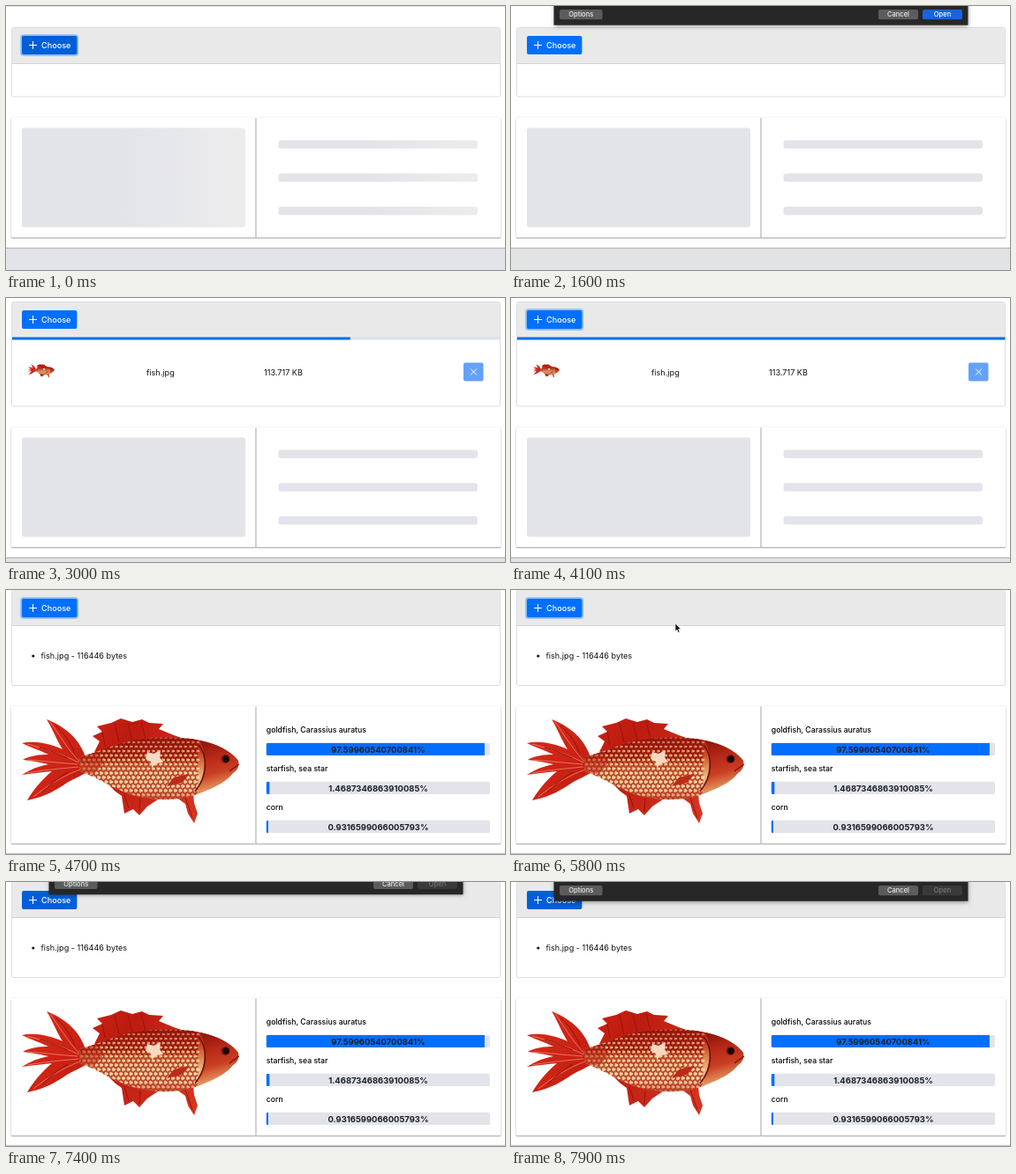
These frames come from a looping animation (565 px wide and 300 px high, 8000 ms). An HTML page with a canvas:

```html
<!DOCTYPE html>
<html lang="en">
<head>
<meta charset="utf-8">
<title>Image classifier upload</title>
<style>
html, body { margin: 0; width: 100%; height: 100%; overflow: hidden; background: #fff; }
canvas { display: block; width: 565px; height: 300px; }
</style>
</head>
<body>
<canvas id="stage"></canvas>
<script>
const W = 565, H = 300, LOOP = 8000, STEP = 100;
const FONT = 'Inter, "Liberation Sans", sans-serif';
const BLUE = '#006fff', DARK_BLUE = '#005fd8', TRACK = '#e3e4e9';

const canvas = document.getElementById('stage');
const ctx = canvas.getContext('2d');
const dpr = window.devicePixelRatio || 1;
canvas.width = W * dpr;
canvas.height = H * dpr;

const clamp = v => Math.max(0, Math.min(1, v));
const ramp = (t, a, b) => clamp((t - a) / (b - a));
const easeOut = p => 1 - (1 - p) ** 3;
const easeInOut = p => p * p * (3 - 2 * p);
const lerp = (a, b, p) => a + (b - a) * p;

function box(x, y, w, h, fill, r = 0, stroke) {
  ctx.beginPath();
  ctx.roundRect(x, y, w, h, r);
  if (fill) { ctx.fillStyle = fill; ctx.fill(); }
  if (stroke) { ctx.strokeStyle = stroke; ctx.lineWidth = 1; ctx.stroke(); }
}

function text(s, x, y, { size = 9.1, color = '#111', weight = 400, align = 'left' } = {}) {
  ctx.font = `${weight} ${size}px ${FONT}`;
  ctx.fillStyle = color;
  ctx.textAlign = align;
  ctx.fillText(s, x, y);
}

function shape(path, fill, stroke, width = 1) {
  const p = new Path2D(path);
  if (fill) { ctx.fillStyle = fill; ctx.fill(p); }
  if (stroke) { ctx.strokeStyle = stroke; ctx.lineWidth = width; ctx.stroke(p); }
}

function disc(x, y, r, fill) {
  ctx.fillStyle = fill;
  ctx.beginPath();
  ctx.arc(x, y, r, 0, 7);
  ctx.fill();
}

function gradient(x0, y0, x1, y1, ...colors) {
  const g = ctx.createLinearGradient(x0, y0, x1, y1);
  colors.forEach((c, i) => g.addColorStop(i / (colors.length - 1), c));
  return g;
}

function chooseButton(y, hover, ring) {
  if (ring) box(16.2, y - 1.8, 65.8, 24.6, '#86bcf8', 3.5);
  box(18, y, 62.4, 21, hover ? DARK_BLUE : BLUE, 2);
  shape(`M26 ${y + 10.5}h9M30.5 ${y + 6}v9`, null, '#fff', 1);
  text('Choose', 40, y + 14, { color: '#fff', size: 9.1, weight: 500 });
}

function panel(top, headerH, height) {
  box(6.5, top + .5, 553, height, '#fff', 2, '#dcdddf');
  box(7, top + 1, 552, headerH, '#e9e9e9', [2, 2, 0, 0]);
  box(7, top + headerH, 552, 1, '#d2d4d6');
}

function cards(y, h) {
  for (const x of [6, 283.5]) {
    ctx.save();
    ctx.shadowColor = 'rgba(0,0,0,.36)';
    ctx.shadowBlur = 2 * dpr;
    ctx.shadowOffsetY = .8 * dpr;
    box(x, y, 276.5, h, '#fff', 1);
    ctx.restore();
  }
  box(282.5, y, 1, h, '#c4c4c4');
  box(6, y + h, 554, 1, '#b6b6b6');
}

// shift moves the highlight from -1 (left of the block) to 1 (right of it)
function skeleton(x, y, w, h, shift) {
  const fill = Math.abs(shift) < 1
    ? gradient(x + w * shift, 0, x + w * (1 + shift), 0, TRACK, '#ececed', TRACK)
    : TRACK;
  box(x, y, w, h, fill, 3);
}

function skeletonCards(y, shift) {
  cards(y, 136);
  skeleton(18, y + 11.5, 253, 113, shift);
  for (let i = 0; i < 3; i++) skeleton(308.5, y + 25.5 + i * 37.7, 225.5, 9.5, shift);
}

function pageEnd(y, fill) {
  box(0, y, W, H - y, fill);
  box(0, y - .5, W, 1.5, '#bfc0c3');
}

const BODY = 'M82 190C100 186 118 177 142 171C170 166 205 166 228 173C246 178 257 186 263 194C264 200 262 205 257 208' +
  'C250 217 239 223 224 229C204 239 174 241 147 234C124 228 108 215 84 206Z';
const TAIL = 'M90 190C85 174 72 157 46 147C53 158 56 168 64 181C48 174 32 171 18 174C28 179 38 182 48 187' +
  'C38 187 27 188 19 193C30 194 39 196 48 198C37 200 27 204 18 210C31 208 42 207 52 206C40 216 31 227 24 239' +
  'C45 235 59 226 69 219C78 214 85 211 92 207Z';
const FINS = [
  'M100 184L106 172L98 166L109 161L103 155L119 151L130 146L143 150L154 147L162 151L178 152L173 158L190 165L204 170L148 179Z',
  'M112 217L124 229L131 234L134 254L144 249L151 256L160 246L172 238Z',
  'M192 235L203 243L206 254L213 265L217 254L213 242L212 231Z'
];

function scales() {
  for (let row = 0; row < 15; row++) {
    for (let col = 0; col < 25; col++) {
      const x = 86 + col * 5.6 + (row % 2) * 2.8, y = 168 + row * 5;
      if (x > 220) continue;
      ctx.strokeStyle = row < 6 ? '#86150b' : '#b33a22';
      ctx.lineWidth = 1.3;
      ctx.beginPath();
      ctx.arc(x, y, 3.3, Math.PI * .5, Math.PI * 1.5);
      ctx.stroke();
      ctx.fillStyle = `rgba(255,236,200,${.3 + .4 * Math.sin(row / 14 * Math.PI)})`;
      ctx.fillRect(x - 1.5, y - 1, 3, 2);
    }
  }
}

function fish() {
  const fin = gradient(18, 145, 220, 260, '#dc2c1b', '#bd1b10', '#d63822');
  shape(TAIL, fin);
  FINS.forEach(f => shape(f, fin));
  shape('M84 196C69 180 60 164 50 150M82 196C61 185 41 180 24 175M81 198C56 196 39 194 25 193' +
    'M82 201C60 203 40 205 24 208M84 204C62 212 45 224 31 235', null, '#ee8a72', .8);
  shape('M78 186C73 173 65 162 56 154M70 191C58 186 48 181 38 179M70 207C58 214 48 223 41 230', null, '#8f130c', 1);
  shape('M112 177L109 161M128 173L123 151M143 171L138 151M158 169L153 150M134 233L139 248M152 237L151 252M203 236L211 259',
    null, '#941409', .9);

  shape(BODY, gradient(0, 168, 0, 241, '#a71d0f', '#c33b1e', '#d97b45', '#eab57c', '#e9b585', '#c13a22'));
  ctx.save();
  ctx.clip(new Path2D(BODY));
  scales();
  shape('M216 164C229 184 228 210 211 242L270 230L270 164Z',
    gradient(226, 172, 240, 226, '#8f170d', '#b62817', '#c93e22', '#e59a62'));
  shape('M80 188L100 184L112 195L100 209L80 208Z', 'rgba(184,34,18,.5)');
  ctx.restore();

  shape('M218 176C229 189 228 212 214 229', null, '#6f120a', 1.7);
  shape('M160 184L167 186L175 182L174 190L178 196L170 197L165 202L164 195L158 192Z', '#f6d9c0');
  shape('M208 209L190 213L182 223L199 219Z', '#bb2b19');
  shape('M264 198Q258 202 253 206', null, '#741309', 1.2);
  disc(248.5, 192, 5, '#7d1b10');
  disc(249, 192, 3.7, '#190706');
}

function thumbnail() {
  ctx.save();
  ctx.translate(25, 75);
  ctx.scale(.121, .13);
  ctx.translate(-18, -145);
  fish();
  ctx.restore();
}

function dialog(reveal, enabled) {
  if (reveal <= 0) return;
  ctx.save();
  ctx.translate(0, -34 * (1 - reveal));
  ctx.save();
  ctx.shadowColor = 'rgba(0,0,0,.4)';
  ctx.shadowBlur = 5 * dpr;
  ctx.shadowOffsetY = 1 * dpr;
  box(48.5, -40, 469, 61.7, '#272727');
  ctx.restore();
  const button = (label, x, w, fill, color) => {
    box(x, 4, w, 11.3, fill, 2);
    text(label, x + w / 2, 12.4, { size: 7.5, color, align: 'center', weight: 500 });
  };
  button('Options', 55, 48.5, '#5c5c5c', '#eee');
  button('Cancel', 416, 45, '#5c5c5c', '#eee');
  button('Open', 466, 45, enabled ? '#1665df' : '#393939', enabled ? '#fff' : '#777');
  ctx.restore();
}

function emptyPage(t) {
  const picked = t >= 1600;
  if (t < 300) box(0, 0, W, 1, '#e2e2e2');
  panel(24, 41, 78.5);
  chooseButton(34, !picked, t < 300);
  skeletonCards(127, picked ? 1 : .45);
  pageEnd(275, picked ? '#e2e3e5' : TRACK);
  const reveal = picked ? 1 - ramp(t, 1600, 1850) : easeOut(ramp(t, 200, 700));
  dialog(reveal, t >= 1300);
}

function uploadPage(t) {
  panel(4, 41, 118.5);
  box(7, 44, 552, 3.5, '#dfe1e9');
  box(7, 44.5, 552.5 * easeInOut(ramp(t, 2400, 3350)), 3, '#0a6fe8');
  chooseButton(14, false, t >= 3400);
  if (t >= 2300) thumbnail();
  text('fish.jpg', 159, 87.5);
  text('113.717 KB', 292, 87.5);
  box(518, 73.5, 22.5, 21, '#63a1fa', 2);
  shape('M526 80.5l7 7m0-7l-7 7', null, '#fff', 1);
  skeletonCards(147, lerp(-1, 1, ramp(t, 1750, 2450)));
  pageEnd(295, '#e2e3e5');
}

const RESULTS = [
  ['goldfish, Carassius auratus', '97.59960540700841%', .976],
  ['starfish, sea star', '1.4687346863910085%', .0147],
  ['corn', '0.9316599066005793%', .0093]
];

function resultRow([label, value, share], i) {
  const x = 294.6, y = 173.7 + i * 44, w = 253.4, h = 14.4;
  text(label, 294.8, y - 11.5, { size: 8.7, weight: 500, color: '#000' });
  ctx.save();
  box(x, y, w, h, TRACK, 2.2);
  ctx.clip();
  box(x, y, Math.max(2.4, w * share), h, BLUE);
  ctx.restore();
  text(value, 421.5, y + 10.8, { size: 9.45, weight: 700, align: 'center', color: '#1c2024' });
}

function arrowCursor(x, y) {
  shape(`M${x} ${y}v9l2-1.8 1.5 3.2 1.5-.7-1.4-3.1h2.8z`, '#111', '#fff', .6);
}

function handCursor(x, y) {
  shape(`M${x} ${y}q1-1 1.7 0v3.4q1.1-.6 1.6.3 1.1-.4 1.5.5 1.4-.1 1.4 1.2v2.2l-1 2.6h-4.2l-2.8-3.8q-.2-1.5 1.8-.4z`,
    '#fff', '#222', .8);
}

function resultPage(t) {
  const hover = t >= 6500;
  panel(-1, 41, 109);
  chooseButton(10, hover, t < 7300);
  disc(30.8, 75, 1.6, '#111');
  text('fish.jpg - 116446 bytes', 39.5, 78);
  cards(132, 156);
  fish();
  RESULTS.forEach(resultRow);
  box(0, 298.7, W, 1.3, '#cfcfd2');

  if (t >= 5300 && t < 7300) {
    const drop = easeOut(ramp(t, 5300, 5800));
    const slide = easeInOut(ramp(t, 5900, 6600));
    const x = lerp(lerp(194, 186, drop), 63, slide);
    const y = lerp(lerp(-12, 38, drop), 27, slide);
    hover ? handCursor(x, y) : arrowCursor(x, y);
  }
  dialog(easeOut(ramp(t, 7200, 7700)), false);
}

function draw(now) {
  const t = Math.floor((now % LOOP) / STEP) * STEP;
  ctx.setTransform(dpr, 0, 0, dpr, 0, 0);
  ctx.fillStyle = '#fff';
  ctx.fillRect(0, 0, W, H);
  if (t < 1900) emptyPage(t);
  else if (t < 4200) uploadPage(t);
  else resultPage(t);
}

const start = performance.now();
function tick() {
  draw(performance.now() - start);
  requestAnimationFrame(tick);
}
tick();
</script>
</body>
</html>
```
